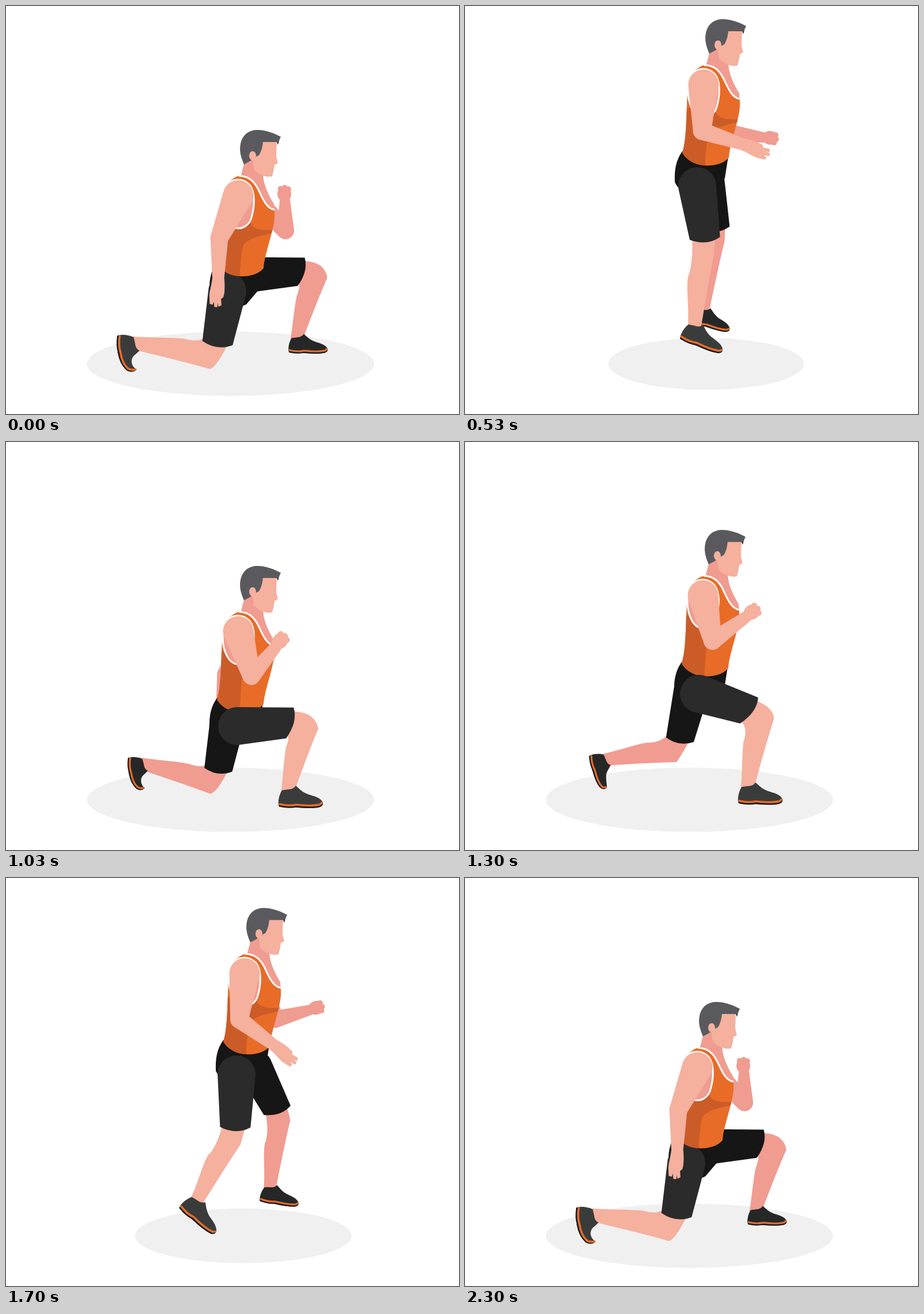
An HTML page with a canvas for the animation above (2330 ms loop, 788x711 px).

```html
<!DOCTYPE html>
<html lang="en">
<head>
<meta charset="utf-8">
<title>Jumping lunge</title>
<style>
html, body { margin: 0; width: 100%; height: 100%; overflow: hidden; background: #fff; }
canvas { display: block; }
</style>
</head>
<body>
<canvas id="stage" width="788" height="711"></canvas>
<script>
const ctx = document.getElementById('stage').getContext('2d');
const LOOP = 2330, RISE = 193;
const SKIN = '#f5b09e', SKIN_FAR = '#f09c91', ORANGE = '#e86c28', SHADE = '#cb5c28';
const SHORTS = '#2b2b2b', SHORTS_FAR = '#161616', SHOE = '#3a3c3b', SHOE_FAR = '#262827';

// leg: hip x, hip y (body space), thigh angle, ankle x, ankle y (stage), foot angle
// arm: upper angle, forearm angle, forearm length
const APEX = { p: 1, nearLeg: [393, 507, 82, 400, 556, 20], farLeg: [410, 497, 80, 415, 528, 15],
  nearArm: [92, 18, 78], farArm: [76, 8, 62] };
const FAR_FORWARD = [
  { p: 0, nearLeg: [385, 497, 101, 226, 588, 85], farLeg: [429, 468, -3, 506.5, 576, 0],
    nearArm: [114, 91.5, 74], farArm: [46, -91, 52] },
  { p: .36, nearLeg: [377, 501, 100, 229, 575, 75], farLeg: [425, 473, 32, 506.5, 576, 0],
    nearArm: [109, 71, 78], farArm: [54, -63, 57] },
  { p: .67, nearLeg: [386.5, 505, 103, 255, 566, 60], farLeg: [436, 489, 43, 512, 549, 0],
    nearArm: [102, 58, 78], farArm: [60, -42, 62] },
  APEX];
const NEAR_FORWARD = [
  { p: 0, nearLeg: [402, 495, -3, 491, 604, 0], farLeg: [385, 488, 101, 241, 562, 84],
    nearArm: [73.6, -50, 66], farArm: [119, 97, 70] },
  { p: .56, nearLeg: [393.5, 506, 34.6, 493, 594, 0], farLeg: [381.5, 507, 105, 250, 547, 67],
    nearArm: [81.5, -25, 76], farArm: [96, 68, 74] },
  { p: .66, nearLeg: [394.5, 507, 40.6, 490, 587, -1], farLeg: [387.5, 509, 103, 268, 548, 58],
    nearArm: [83, -22, 76], farArm: [92, 58, 60] },
  APEX];

const rad = deg => deg * Math.PI / 180;
const mix = (a, b, k) => a + (b - a) * k;
const mixAll = (a, b, k) => a.map((v, i) => mix(v, b[i], k));
const polar = ([x, y], deg, r) => [x + r * Math.cos(rad(deg)), y + r * Math.sin(rad(deg))];

function poseAt(keys, p) {
  let i = 1;
  while (i < keys.length - 1 && p > keys[i].p) i++;
  const a = keys[i - 1], b = keys[i], k = (p - a.p) / (b.p - a.p), pose = {};
  for (const limb of ['nearLeg', 'farLeg', 'nearArm', 'farArm']) pose[limb] = mixAll(a[limb], b[limb], k);
  return pose;
}

// Height of the jump: 0 in the lunge, 1 at the top.
function motionAt(t) {
  const part = (from, to) => Math.min(1, Math.max(0, (t - from) / (to - from)));
  const out = (u, k) => 1 - (1 - u) ** k;
  if (t < 550) return [FAR_FORWARD, out(part(0, 530), 1.16)];
  if (t < 1080) return [NEAR_FORWARD, 1 - out(part(535, 1030), 1.157)];
  if (t < 1650) return [NEAR_FORWARD, part(1097, 1630) ** 1.165];
  return [FAR_FORWARD, 1 - out(part(1635, 2170), 1.27)];
}

function fill(path, color) {
  ctx.fillStyle = color;
  ctx.fill(new Path2D(path));
}
function stroke(path, color, width) {
  ctx.strokeStyle = color;
  ctx.lineWidth = width;
  ctx.stroke(new Path2D(path));
}
function ellipse(x, y, rx, ry, color) {
  ctx.fillStyle = color;
  ctx.beginPath();
  ctx.ellipse(x, y, rx, ry, 0, 0, 7);
  ctx.fill();
}
function local([x, y], deg, scale, draw) {
  ctx.save();
  ctx.translate(x, y);
  ctx.rotate(rad(deg));
  ctx.scale(scale, scale);
  draw();
  ctx.restore();
}

function bone(a, ra, b, rb, color) {
  const dx = b[0] - a[0], dy = b[1] - a[1];
  const dir = Math.atan2(dy, dx), phi = Math.acos((ra - rb) / Math.hypot(dx, dy));
  ctx.fillStyle = color;
  ctx.beginPath();
  ctx.arc(...a, ra, dir + phi, dir - phi + 2 * Math.PI);
  ctx.arc(...b, rb, dir - phi, dir + phi);
  ctx.fill();
}

function fist(color) {
  ellipse(13, -1, 15, 13, color);
  for (const [x, y] of [[23, -8], [25, 0], [22, 7]]) ellipse(x, y, 5, 5, color);
}
function openHand(color) {
  const hand = 'M-2-10C8-11 20-12 29-9L32-5L43-6L45-2L34 0L46 1L46 5L34 6L42 9L41 13L26 14C14 13 8 10-2 10Z';
  ctx.lineJoin = 'round';
  fill(hand, color);
  stroke(hand, color, 1.5);
}

function arm([upper, fore, length], shoulder, reach, radii, closed, color, scale) {
  const elbow = polar(shoulder, upper, reach), wrist = polar(elbow, fore, length);
  bone(shoulder, radii[0], elbow, radii[1], color);
  bone(elbow, radii[1], wrist, radii[2], color);
  local(wrist, fore, scale, () => (closed ? fist : openHand)(color));
}

// The bend curls the toe up, as in a foot resting on its tip.
function shoe(bend, color) {
  const at = (x0, y0, x1, y1) => [mix(x0, x1, bend), mix(y0, y1, bend)].join(' ');
  const sole = y => `M-15 ${27 + y}Q0 ${31 + y} 14 ${28 + y}Q${at(40, 31 + y, 32, 27 + y)} ` +
    `${at(54, 28 + y, 42, 18 + y)}Q${at(57, 27 + y, 46, 13 + y)} ${at(58, 25, 45, 5)}`;
  fill('M-11 3C-15 9-18 20-17 28Q-17 32-13 32L14 33' +
    `Q${at(40, 35, 34, 31)} ${at(55, 32, 46, 20)}Q${at(62, 30, 52, 11)} ${at(60, 24, 46, 3)}` +
    `C${at(57, 17, 41, 8)} ${at(48, 14, 36, 11)} ${at(38, 11, 29, 10)}` +
    `C${at(27, 8, 20, 8)} ${at(22, 3, 20, 2)} 13-5Q10 0 4 1Q-6 2-11 3Z`, color);
  ctx.lineCap = 'round';
  stroke(sole(3), '#1c1c1c', 3);
  stroke(sole(0), ORANGE, 3.6);
}

function leg([hx, hy, angle, ax, ay, foot], dx, dy, s, shoeScale, skin, cloth, leather) {
  const hip = [hx + dx, hy + dy], c = Math.cos(rad(angle)), n = Math.sin(rad(angle));
  const thigh = (x, y) => [hip[0] + s * (x * c - y * n), hip[1] + s * (x * n + y * c)];
  const knee = thigh(110, 0), vx = ax - knee[0], vy = ay - knee[1], len = Math.hypot(vx, vy);
  const shin = (t, f) => [knee[0] + vx * t + s * f * vy / len, knee[1] + vy * t - s * f * vx / len];
  const turn = (Math.atan2(vy, vx) * 180 / Math.PI - angle + 360) % 360;
  const bend = turn > 180 ? 0 : turn;
  const cap = Math.max(15, 8 + .24 * bend), calf = Math.min(24, 27 - .1 * bend);

  ctx.fillStyle = skin;
  ctx.beginPath();
  ctx.moveTo(...thigh(82, -21));
  ctx.quadraticCurveTo(...thigh(110 + .8 * cap, -10 - 13 * c), ...shin(.04, cap));
  ctx.quadraticCurveTo(...shin(.35, .65 * cap + 3), ...shin(1.04, 11));
  ctx.lineTo(...shin(1.1, -11));
  ctx.bezierCurveTo(...shin(.8, -13), ...shin(.58, -calf), ...shin(.4, -calf));
  ctx.quadraticCurveTo(...shin(.22, -.75 * calf), ...thigh(84, 21));
  ctx.fill();

  local([ax, ay], foot, shoeScale, () => shoe(Math.max(0, foot / 85) ** 6, leather));
  local(hip, angle, s, () => {
    const slant = 8 * c;
    fill(`M0-33L${92 + slant}-27Q106-2 ${92 - slant} 26L0 33A33 33 0 0 1 0-33Z`, cloth);
  });
}

function head() {
  fill('M414 275L408 298L440 345L467 356L466 345C456 328 448 312 447 293L432 262L424 262Z', SKIN_FAR);
  fill('M443 234L471 236L470 262L473 274L467 277L466 285L463 297C450 299 440 294 431 285L428 262Z', SKIN);
  fill('M470 234L475 235L473 242Z', '#2b2b2d');
  fill('M414 276C407 260 406 250 408 240C412 222 425 215 440 216C455 217 467 222 478 228L474 237' +
    'L447 237C446 245 445 252 440 260L436 262L425 270Z', '#5a5a5e');
  ellipse(429, 261, 6, 8, SKIN);
}

function torso(armBack) {
  const neckline = 'C453 353 446 335 439 320C431 304 421 296 405 296';
  const shirt = 'M405 296C398 298 390 303 384 312C376 330 376 345 375 365C374 400 373 430 367 449' +
    'C379 468 400 472 415 471C430 470 441 465 448 457C449 440 456 420 462 396C466 380 468 370 467 356' + neckline + 'Z';
  const armhole = 'M384 313C392 300 412 299 424 312C434 325 433 350 426 372C420 386 406 390 397 386' +
    'C384 380 377 360 377 340C377 330 380 320 384 313Z';
  fill(shirt, ORANGE);
  ctx.save();
  ctx.clip(new Path2D(shirt));
  fill(armBack
    ? 'M360 370L422 372C428 390 440 391 468 390L464 396C440 400 422 406 413 416C409 430 408 450 406 475L360 475Z'
    : 'M360 355L412 385L406 475L360 475Z', SHADE);
  ctx.restore();
  ctx.lineCap = 'butt';
  stroke('M467 355' + neckline, '#fff', 3);
  fill(armhole, SKIN_FAR);
  stroke(armhole, '#fff', 3);
}

function draw(t) {
  const [keys, p] = motionAt(t), pose = poseAt(keys, p);
  const armBack = keys === FAR_FORWARD;
  const dx = 11 * Math.min(1, p / .36), dy = -RISE * p, air = Math.max(0, p - .33);
  const onBody = paint => local([dx, dy], 0, 1, paint);
  const nearLeg = () => leg(pose.nearLeg, dx, dy, 1, 1, SKIN, SHORTS, SHOE);

  ctx.fillStyle = '#fff';
  ctx.fillRect(0, 0, 788, 711);
  ellipse(390.5 + 43 * air, 623.5, 249.5 - 118 * air, 56 - 16 * air, '#f0f0f0');
  arm(pose.farArm, [425 + dx, 328 + dy], 88, [18, 15, 9], armBack, SKIN_FAR, .92);
  leg(pose.farLeg, dx, dy, .92, .88, SKIN_FAR, SHORTS_FAR, SHOE_FAR);
  onBody(() => {
    head();
    fill('M367 446C356 462 353 478 354 500C365 525 400 530 418 520L441 493L447 455Z', SHORTS_FAR);
  });
  if (armBack) nearLeg();
  onBody(() => torso(armBack));
  if (!armBack) nearLeg();
  arm(pose.nearArm, [404 + dx, 330 + dy], 81, [26.5, 15.5, 10], !armBack, SKIN, 1);
}

const start = performance.now();
function tick() {
  const t = (performance.now() - start) % LOOP;
  draw(Math.floor((t + 4) * .03) / .03);
  requestAnimationFrame(tick);
}
tick();
</script>
</body>
</html>
```
